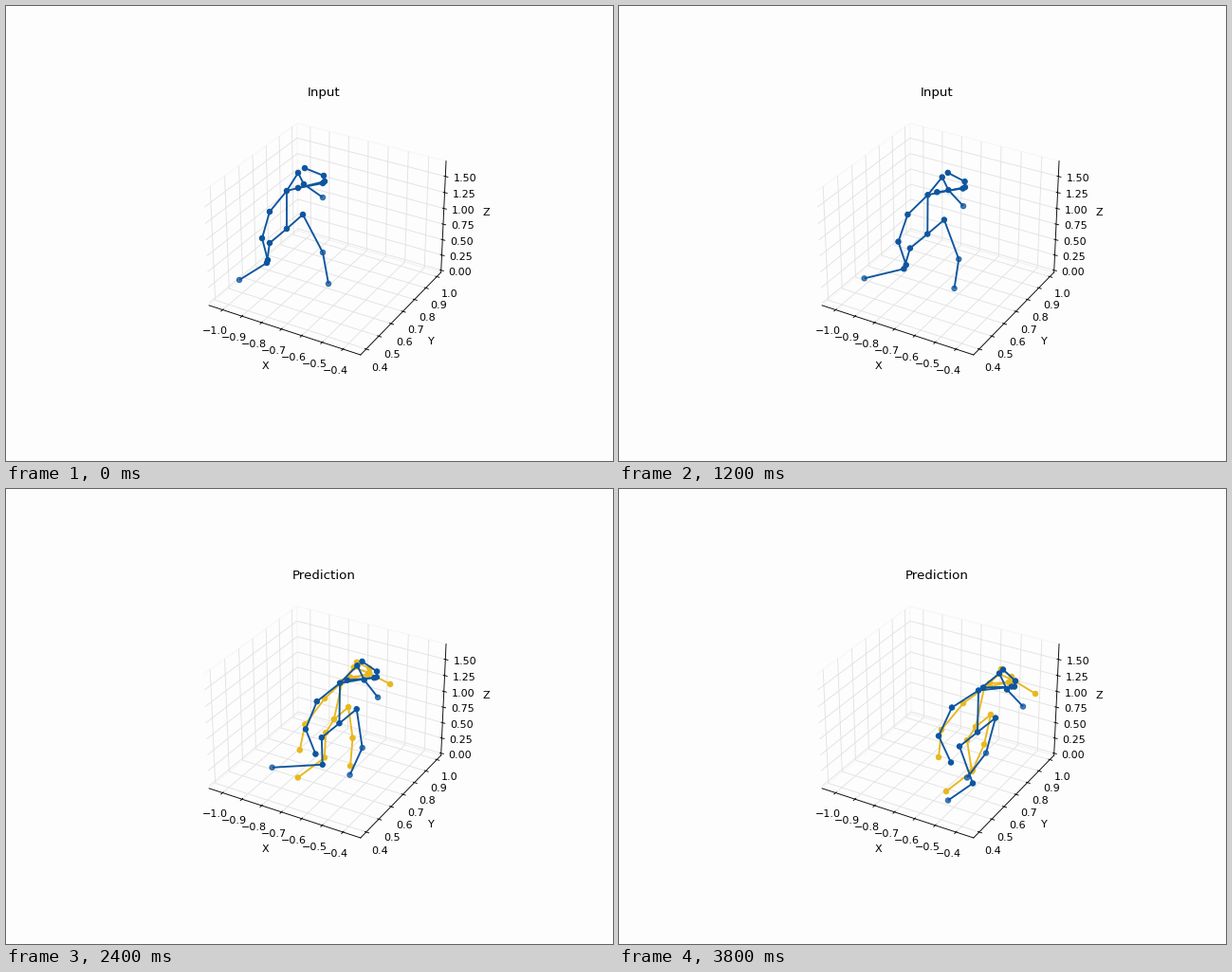
A matplotlib script that plays this animation: 640 by 480 pixels, repeating every 4000 ms.

```python
import numpy as np
import matplotlib.pyplot as plt
from matplotlib.animation import FuncAnimation
from matplotlib.collections import LineCollection
from matplotlib.colors import to_rgb

W, H, DPI = 640, 480, 80
FRAMES, STEP = 20, 200
SPLIT, REVEAL = 2000, 2400
BG, GRID, PANE = "#fdfdfd", "#e2e2e2", "#f0f0f0"
BLUE, GOLD = "#0d559f", "#e8b81c"


class Bone:
    """Pixel vector from parent to joint: starts at rest, adds swing over the
    loop, and bulges by bow on the way (skew moves the peak of the bulge).
    The prediction skips the bow and is off by miss."""

    def __init__(self, joint, parent, rest, swing, miss, bow=(0, 0), skew=1):
        self.joint, self.parent, self.skew = joint, parent, skew
        self.rest, self.swing, self.miss, self.bow = map(
            np.array, (rest, swing, miss, bow))

    def vector(self, u, predicted):
        straight = self.rest + self.swing * u
        if predicted:
            return straight + self.miss
        return straight + self.bow * np.sin(np.pi * u ** self.skew)


RIG = [
    Bone("hip", None, (296, 235), (82, 21.5), (-2, -5.5), bow=(4, -1.5)),
    Bone("neck", "hip", (0, -40), (1, -4), (8, 3)),
    Bone("nose", "neck", (40, -10), (-2, 6), (-10, -3)),
    Bone("r_eye", "nose", (-1, -6), (2, 0), (0, 1)),
    Bone("r_ear", "r_eye", (-20, -8), (7, -4), (2, 4)),
    Bone("l_eye", "nose", (-2, 2), (-1, -2), (1, 1)),
    Bone("l_ear", "l_eye", (-26, 5), (-4, -4), (10, 0)),
    Bone("r_shoulder", "neck", (12, -19), (10, 1), (-6, 3)),
    Bone("r_elbow", "r_shoulder", (6, 12), (2, 5), (9, -9)),
    Bone("r_wrist", "r_elbow", (20, 14), (-3, 4), (4, -5), bow=(-4, 2)),
    Bone("l_shoulder", "neck", (-18, 22), (-10, -4), (6, -2)),
    Bone("l_elbow", "l_shoulder", (-8, 28), (-6, 2), (-9, -2)),
    Bone("l_wrist", "l_elbow", (6, 23), (7, 5), (-16, 1)),
    Bone("r_hip", "hip", (17, -15), (2, 0), (-3, 2)),
    Bone("r_knee", "r_hip", (21, 40), (-31, -3), (3, -5.5), bow=(5, 3)),
    Bone("r_ankle", "r_knee", (6, 33), (-26, -7), (8, 1), bow=(-3, 0)),
    Bone("l_hip", "hip", (-18, 15), (-1, 0), (10, -1)),
    Bone("l_knee", "l_hip", (-3, 21), (17, 18), (-9, -6), bow=(-9, -5), skew=0.7),
    Bone("l_ankle", "l_knee", (-29, 18), (3, 0), (-1, 3), bow=(-26, -15), skew=1.5),
]
INDEX = {b.joint: i for i, b in enumerate(RIG)}
PAIRS = np.array([(INDEX[b.parent], INDEX[b.joint]) for b in RIG if b.parent])
FAR = ("r_wrist", "r_knee", "r_ankle", "l_ankle")


def pose(t, predicted=False):
    u = t / (STEP * (FRAMES - 1))
    at = {None: np.zeros(2)}
    for b in RIG:
        at[b.joint] = at[b.parent] + b.vector(u, predicted)
    return np.array([at[b.joint] for b in RIG])


plt.rcParams.update({
    "font.family": "DejaVu Sans",
    "grid.color": GRID,
    "grid.linewidth": 0.8,
})
fig = plt.figure(figsize=(W / DPI, H / DPI), dpi=DPI, facecolor=BG)

# Empty 3D stage
SIDE, CX, CY = 284.3, 334.8, 243.8
box = [(CX - SIDE / 2) / W, 1 - (CY + SIDE / 2) / H, SIDE / W, SIDE / H]
ax = fig.add_axes(box, projection="3d", facecolor="none")
ax.view_init(elev=30, azim=-60)
ax.set(xlim=(-1.0706, -0.3165), ylim=(0.356, 1.039), zlim=(-0.0354, 1.7354),
       xlabel="X", ylabel="Y", zlabel="Z")
ax.set_xticks(np.arange(-10, -3) / 10)
ax.set_yticks(np.arange(4, 11) / 10)
ax.set_zticks(np.arange(7) / 4)
for axis in (ax.xaxis, ax.yaxis, ax.zaxis):
    axis.pane.fill = False
    axis.pane.set_edgecolor(PANE)
title = fig.text(CX / W, 1 - 95 / H, "", ha="center", va="baseline", fontsize=12)

# Flat layer in pixels for the skeletons
layer = fig.add_axes([0, 0, 1, 1], facecolor="none")
layer.axis("off")


class Skeleton:
    def __init__(self, color, z, far=()):
        colors = [(*to_rgb(color), 0.75 if b.joint in far else 1) for b in RIG]
        start = pose(0)
        self.bones = LineCollection(start[PAIRS], colors=color,
                                    linewidths=1.7, zorder=z)
        layer.add_collection(self.bones, autolim=False)
        self.dots = layer.scatter(*start.T, s=23, c=colors, linewidths=1,
                                  zorder=z + 0.5)

    def place(self, points):
        self.bones.set_segments(points[PAIRS])
        self.dots.set_offsets(points)

    def show(self, on):
        self.bones.set_visible(on)
        self.dots.set_visible(on)


guess = Skeleton(GOLD, 2)
truth = Skeleton(BLUE, 3, FAR)
layer.set(xlim=(0, W), ylim=(H, 0))


def update(k):
    t = k * STEP
    title.set_text("Input" if t < SPLIT else "Prediction")
    truth.place(pose(t))
    guess.place(pose(t, predicted=True))
    guess.show(t >= REVEAL)
    return ()


anim = FuncAnimation(fig, update, frames=FRAMES, interval=STEP,
                     init_func=lambda: update(0), repeat=True,
                     repeat_delay=0, blit=False)
plt.show()
```
